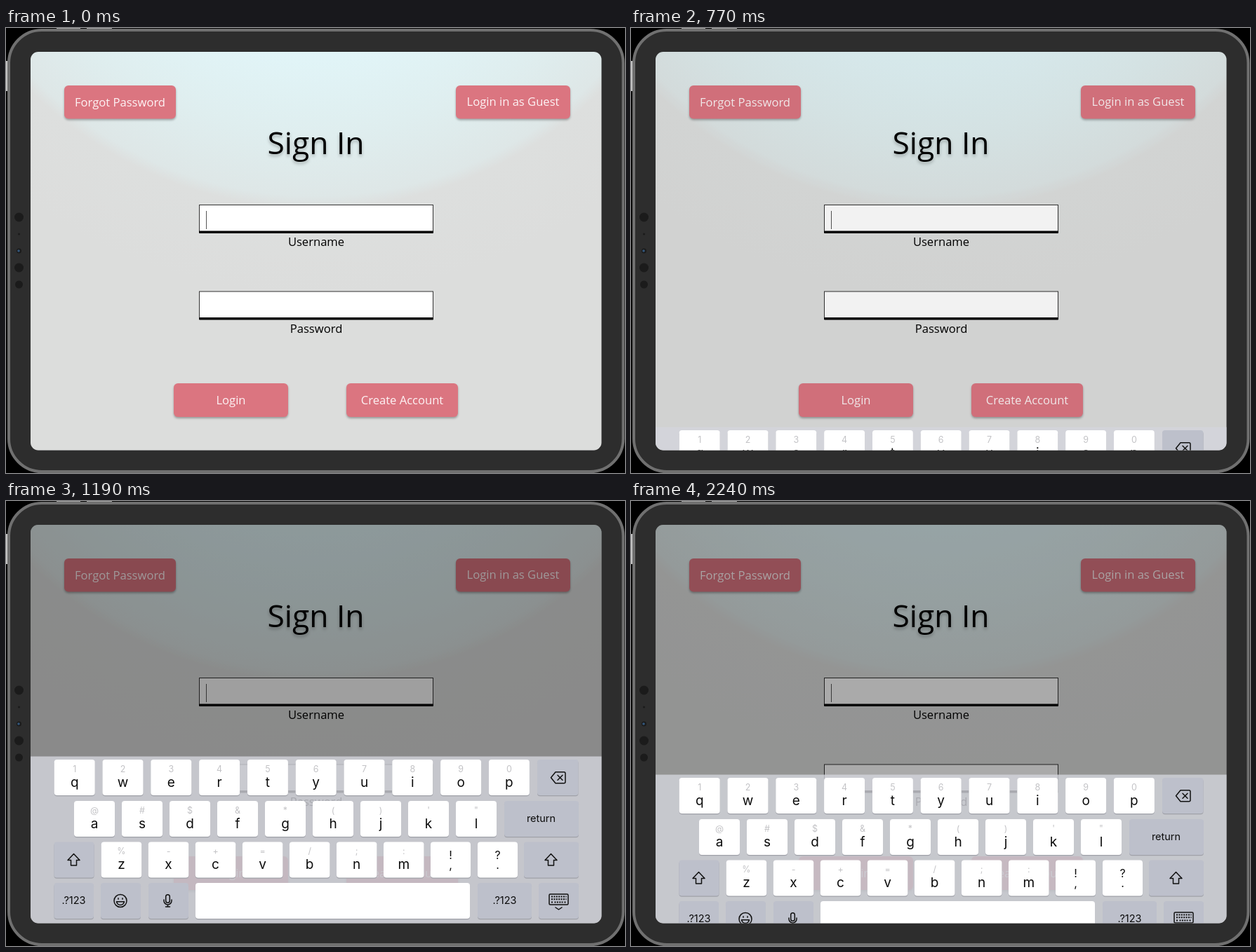
Write an HTML page that moves like this. It is 882 by 635 pixels and loops after 2310 ms.

```html
<!DOCTYPE html>
<html lang="en">
<head>
<meta charset="utf-8">
<title>Sign in</title>
<style>
html, body { margin: 0; width: 100%; height: 100%; overflow: hidden; background: #000; }
svg { display: block; width: 882px; height: 635px; }
text { text-anchor: middle; font-family: "Open Sans", "Noto Sans", sans-serif; font-size: 16.6px; }
.title { font-size: 44.3px; filter: drop-shadow(0 3px 2px rgba(0,0,0,.25)); }
.btn rect { fill: #db7580; filter: drop-shadow(0 2px 1.5px rgba(0,0,0,.3)); }
.btn text { fill: #fdf3f4; }
#kb text { font-family: Inter, Roboto, sans-serif; font-size: 19px; fill: #0c0c0c; }
#kb .hint { font-size: 12.5px; fill: #c3c3c6; }
#kb .word { font-size: 14.5px; }
#kb .mark { font-size: 16px; }
.icon { fill: none; stroke: #111; stroke-width: 1.5; stroke-linejoin: round; stroke-linecap: round; }
</style>
</head>
<body>
<svg viewBox="0 0 882 635" xmlns="http://www.w3.org/2000/svg">
  <defs>
    <radialGradient id="glow" gradientUnits="userSpaceOnUse" cx="441" cy="-320" r="700">
      <stop offset=".5" stop-color="#e1f5f8"/>
      <stop offset=".67" stop-color="#dfeeef"/>
      <stop offset=".8" stop-color="#dee7e7"/>
      <stop offset=".825" stop-color="#dddfde"/>
      <stop offset="1" stop-color="#dcdddc"/>
    </radialGradient>
    <clipPath id="screen"><rect x="35" y="34" width="813.5" height="568.5" rx="11"/></clipPath>
  </defs>

  <g fill="#a3a3a3">
    <rect x="72" y="0" width="34" height="3"/>
    <rect x="115" y="0" width="36" height="3"/>
    <rect x="0" y="47" width="3" height="43" fill="#c4c4c4"/>
  </g>
  <rect x="4" y="3" width="875.5" height="630" rx="47" fill="#2d2d2d" stroke="#707070" stroke-width="4"/>
  <g fill="#1b1b1b">
    <circle cx="18.5" cy="270" r="6.5"/>
    <circle cx="18.5" cy="294" r="1.5"/>
    <circle cx="18.5" cy="318" r="3.5"/>
    <circle cx="18" cy="318" r="1.8" fill="#33577c"/>
    <circle cx="18.5" cy="342" r="6.5"/>
    <circle cx="18.5" cy="366" r="5.5"/>
  </g>

  <g clip-path="url(#screen)">
    <rect x="35" y="34" width="814" height="569" fill="url(#glow)"/>
    <g id="form"></g>
    <rect id="dim" x="35" y="34" width="814" height="569" opacity="0"/>
    <g id="kb"></g>
  </g>
</svg>

<script>
const LOOP = 2310, TRAVEL = 238, DIM = 0.375;
const form = document.getElementById('form');
const kb = document.getElementById('kb');
const dim = document.getElementById('dim');

const esc = s => s.replace(/&/g, '&amp;').replace(/"/g, '&quot;');
const label = (x, y, s, cls = '') => `<text class="${cls}" x="${x}" y="${y}">${esc(s)}</text>`;
const box = (x, y, w, h, rx, fill) =>
  `<rect x="${x}" y="${y}" width="${w}" height="${h}" rx="${rx}" fill="${fill}"/>`;

// Sign-in form
const button = (x, y, w, h, s, base) =>
  `<g class="btn"><rect x="${x}" y="${y}" width="${w}" height="${h}" rx="6"/>${label(x + w / 2, base, s)}</g>`;
const field = (y, s) =>
  `<rect x="275.5" y="${y + .5}" width="333" height="39" fill="#fff" stroke="#333"/>` +
  box(275, y + 37.5, 334, 3.5, 1, '#000') + label(442, y + 59, s);

form.innerHTML =
  button(83, 82, 159, 47.5, 'Forgot Password', 112) +
  button(641, 82, 163, 47.5, 'Login in as Guest', 111) +
  label(441.5, 180, 'Sign In', 'title') +
  field(252, 'Username') + field(375.5, 'Password') +
  box(285, 261, 1, 26, 0, '#555') +
  button(239, 507, 163, 48, 'Login', 536.5) +
  button(485, 507, 159, 48, 'Create Account', 536.5);

// Keyboard in its open position
const KEY_H = 51;
const key = (x, y, w, fill = '#fff') =>
  box(x, y + 1.2, w, KEY_H, 4, '#9fa1a8') + box(x, y, w, KEY_H, 4, fill);
const gray = (x, y, w) => key(x, y, w, '#bdc0cb');
const icon = (x, y, d) => `<path class="icon" transform="translate(${x} ${y})" d="${d}"/>`;

function row(x, y, w, pitch, letters, hints) {
  return [...letters].map((c, i) => {
    const left = x + i * pitch, mid = left + w / 2;
    return key(left, y, w) + label(mid, y + 17.5, hints[i], 'hint') + label(mid, y + 38.5, c);
  }).join('');
}
const markKey = (x, y, top, low) =>
  key(x, y, 57, '#fff') + label(x + 28.5, y + 24, top, 'mark') + label(x + 28.5, y + 38, low, 'mark');

const SHIFT = 'M0-8.5L8.5 0.5H4V8H-4V0.5H-8.5Z';
const ERASE = 'M-4-8H8Q10-8 10-6V6Q10 8 8 8H-4L-10.5 0ZM-1-3.5L6 3.5M6-3.5L-1 3.5';
const MIC = 'M-2.8-5.5a2.8 2.8 0 0 1 5.6 0v6a2.8 2.8 0 0 1-5.6 0ZM-5.5-1v1.5a5.5 5.5 0 0 0 11 0v-1.5M0 6v3M-3 9H3';
const FACE = 'M9 0a9 9 0 1 1-18 0a9 9 0 1 1 18 0ZM-3-3.8v1.6M3-3.8v1.6M-5.5 1.2H5.5Q4.500 6 0 6T-5.500 1.200Z';
const HIDE = 'M-12-9H12Q13.500-9 13.500-7.500V4.500Q13.500 6 12 6H-12Q-13.500 6-13.500 4.500V-7.500Q-13.500-9-12-9ZM-4.500 10L0 13L4.500 10';
const hideKeys =
  '<path class="icon" style="stroke-linecap:butt;stroke-width:2" stroke-dasharray="2 1.4" ' +
  'transform="translate(787.5 570)" d="M-10.500-5.500H11M-10.500-1.700H11M-10.500 2.500h3M-6 2.500H6M8 2.500h3"/>';

kb.innerHTML =
  box(35, 364.5, 814, 240, 0, 'rgba(212,213,220,.8)') +
  row(68.7, 369, 58, 68.8, 'qwertyuiop', '1234567890') +
  gray(757, 369, 58.5) + icon(787, 394.8, ERASE) +
  row(97, 428, 58, 68, 'asdfghjkl', '@#$&*()\'"') +
  gray(710, 428, 106) + label(762.5, 457.5, 'return', 'word') +
  gray(68.500, 486.500, 57) + icon(96.500, 512, SHIFT) +
  row(135.700, 486.500, 57.500, 67.050, 'zxcvbnm', '%-+=/;:') +
  markKey(605, 486.500, '!', ',') + markKey(672, 486.500, '?', '.') +
  gray(738, 486.500, 78) + icon(776.500, 512, SHIFT) +
  gray(68.500, 545, 56.500) + label(96.500, 575, '.?123', 'word') +
  gray(135, 545, 57) + icon(163, 570.500, FACE) +
  gray(203, 545, 57) + icon(230.500, 570, MIC) +
  key(270, 545, 391) +
  gray(672, 545, 77) + label(710.500, 575, '.?123', 'word') +
  gray(759, 545, 57) + icon(787.500, 570, HIDE) + hideKeys;

// [time in ms, keyboard offset in px]; each pose holds until the next
const poses = [[0, TRAVEL], [770, 205], [840, 18], [910, 0], [2170, 26], [LOOP, TRAVEL]];

function play(el, style) {
  const steps = poses.map(([t, y]) => ({
    offset: t === 0 || t === LOOP ? t / LOOP : (t - 1) / LOOP,
    easing: 'step-end',
    ...style(y)
  }));
  el.animate(steps, { duration: LOOP, iterations: Infinity });
}
play(kb, y => ({ transform: `translateY(${y}px)` }));
play(dim, y => ({ opacity: DIM * (1 - y / TRAVEL) }));
</script>
</body>
</html>
```
